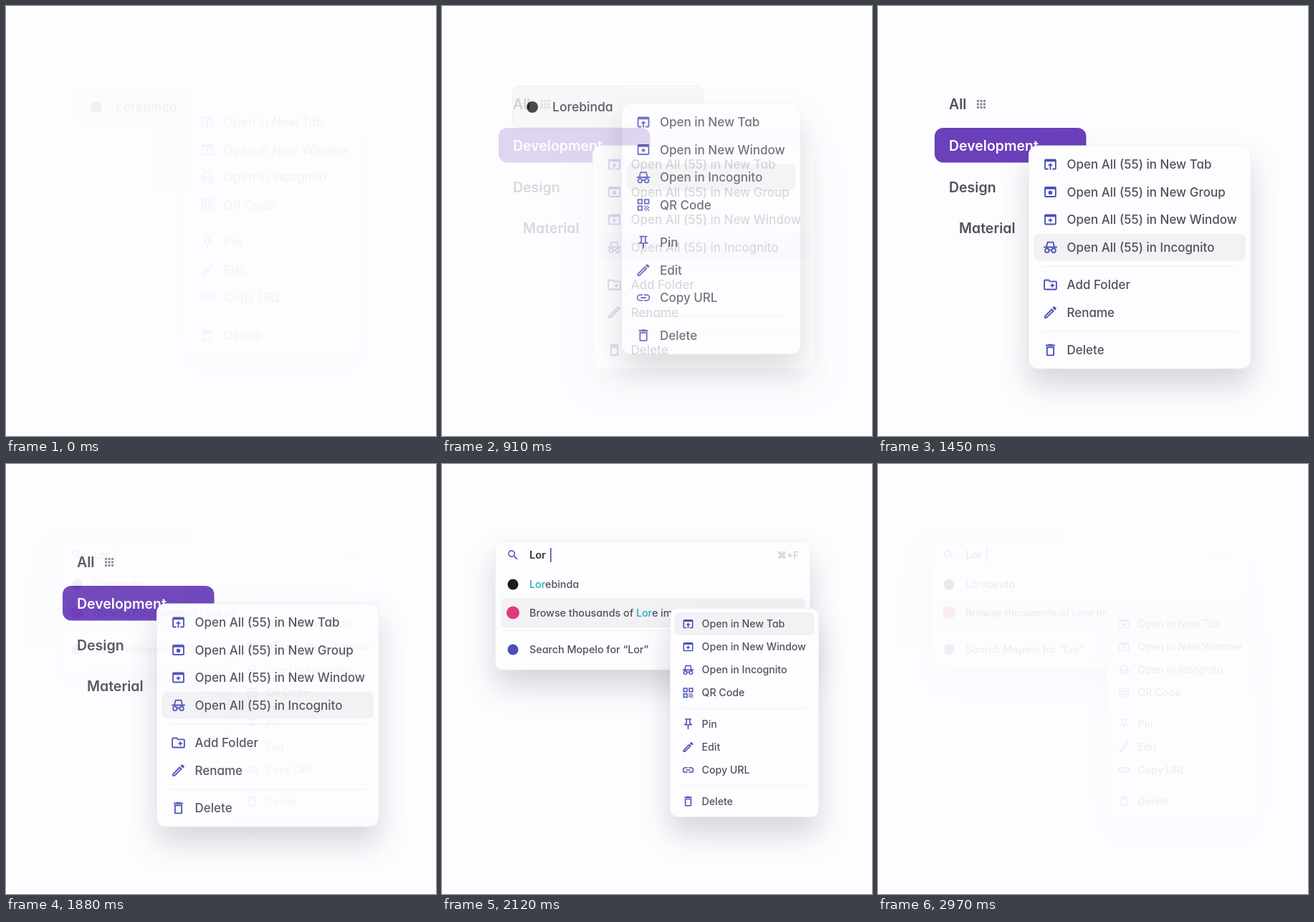
Write an HTML page that moves like this. It is 600 px wide and 600 px high and loops after 3 s.

```html
<!DOCTYPE html>
<html lang="en">
<head>
<meta charset="utf-8">
<title>Context menus</title>
<style>
  html, body { margin: 0; height: 100%; overflow: hidden; background: #fdfcff; }
  svg { display: block; width: 100vw; height: 100vh; }
  text { font-family: Inter, "Open Sans", sans-serif; font-feature-settings: "cv11"; fill: #4f5359; white-space: pre; }
  .paper { fill: #fdfcff; }
  .panel { fill: #fdfcff; stroke: #f0eff3; }
  .hover { fill: #f2f1f4; }
  .rule { stroke: #efeef2; }
  .icon { fill: #4a50b5; fill-rule: evenodd; }
  .line { fill: none; stroke: #4a50b5; stroke-width: 1.9; stroke-linejoin: round; }
  .hit { fill: #1fb0c2; }
</style>
</head>
<body>
<svg viewBox="0 0 600 600" xmlns="http://www.w3.org/2000/svg">
  <defs>
    <filter id="shadow" x="-40%" y="-40%" width="180%" height="200%" color-interpolation-filters="sRGB">
      <feDropShadow dx="0" dy="23" stdDeviation="20" flood-color="#26262e" flood-opacity=".18"/>
    </filter>
  </defs>
  <g id="bookmark"></g>
  <g id="folders"></g>
  <g id="search"></g>
</svg>
<script>
const LOOP = 3000;
const frame = 'M19 4H5a2 2 0 0 0-2 2v12a2 2 0 0 0 2 2h14a2 2 0 0 0 2-2V6a2 2 0 0 0-2-2zm0 14H5V8h14z';

const icons = {
  tab: 'M19 4H5a2 2 0 0 0-2 2v12a2 2 0 0 0 2 2h4v-2H5V8h14v10h-4v2h4a2 2 0 0 0 2-2V6a2 2 0 0 0-2-2zm-7 6l-4 4h3v6h2v-6h3z',
  win: frame + 'm-8-8h2v2h2v2h-2v2h-2v-2H9v-2h2z',
  group: frame + 'm-10-5a3 3 0 1 0 6 0 3 3 0 1 0-6 0z',
  qr: 'M3 3h8v8H3zm2 2v4h4V5zM13 3h8v8h-8zm2 2v4h4V5zM3 13h8v8H3zm2 2v4h4v-4z' +
    [[13, 13], [17, 13], [15, 15], [19, 15], [13, 17], [17, 17], [15, 19], [19, 19]]
      .map(([x, y]) => `M${x} ${y}h2v2h-2z`).join(''),
  pin: 'M14 4v5q0 1.7 1 3H9q1-1.3 1-3V4zm3-2H7a1 1 0 0 0 0 2h1v5a3 3 0 0 1-3 3v2h6v7l1 1 1-1v-7h6v-2a3 3 0 0 1-3-3V4h1a1 1 0 0 0 0-2z',
  edit: 'M14.06 9.02l.92.92L5.92 19H5v-.92zM17.66 3q-.4 0-.7.29l-1.83 1.83 3.75 3.75 1.83-1.83a1 1 0 0 0 0-1.41l-2.34-2.34q-.3-.29-.71-.29zm-3.6 3.19L3 17.25V21h3.75L17.81 9.94z',
  link: 'M3.9 12A3.1 3.1 0 0 1 7 8.9h4V7H7a5 5 0 0 0 0 10h4v-1.9H7A3.1 3.1 0 0 1 3.9 12zM8 13h8v-2H8zm9-6h-4v1.9h4a3.1 3.1 0 0 1 0 6.2h-4V17h4a5 5 0 0 0 0-10z',
  bin: 'M6 19a2 2 0 0 0 2 2h8a2 2 0 0 0 2-2V7H6zM8 9h8v10H8zm7.5-5l-1-1h-5l-1 1H5v2h14V4z',
  add: 'M20 6h-8l-2-2H4a2 2 0 0 0-2 2v12a2 2 0 0 0 2 2h16a2 2 0 0 0 2-2V8a2 2 0 0 0-2-2zm0 12H4V6h5.2l2 2H20zM14 10h2v2h2v2h-2v2h-2v-2h-2v-2h2z',
  find: 'M15.5 14h-.8l-.27-.27A6.5 6.5 0 1 0 13.73 14.43l.27.28v.79l5 4.99L20.49 19zM9.5 14a4.5 4.5 0 1 1 0-9 4.5 4.5 0 0 1 0 9z',
};
const lines = {
  hat: 'M2 12h20M6 12 7.6 5q.2-.8 1-.6L12 5l3.4-.6q.8-.2 1 .6L18 12M4 17a3 3 0 1 0 6 0 3 3 0 1 0-6 0M14 17a3 3 0 1 0 6 0 3 3 0 1 0-6 0M10 16.7q2-1.2 4 0',
};

const rect = (cls, x, y, w, h, r, extra = '') =>
  `<rect class="${cls}" x="${x}" y="${y}" width="${w}" height="${h}" rx="${r}" ${extra}/>`;
const panel = (x, y, w, h, r) => rect('panel', x, y, w, h, r, 'filter="url(#shadow)"');
const dot = (x, y, r, color) => `<circle cx="${x}" cy="${y}" r="${r}" fill="${color}"/>`;
const rule = (x1, x2, y) => `<path class="rule" d="M${x1} ${y}H${x2}"/>`;
const text = (x, y, size, str, weight = 450, extra = '') =>
  `<text x="${x}" y="${y}" font-size="${size}" font-weight="${weight}" ${extra}>${str}</text>`;
const hit = str => `<tspan class="hit">${str}</tspan>`;
const icon = (name, x, y, scale = 0.93) =>
  `<path class="${lines[name] ? 'line' : 'icon'}" d="${icons[name] || lines[name]}"
    transform="translate(${x} ${y}) scale(${scale}) translate(-12 -12)"/>`;

// A null row is a separator.
function menu(x, y, w, rows, hover, scale = 1) {
  let cy = 26, body = '';
  rows.forEach((row, i) => {
    if (!row) {
      body += rule(19, w - 19, cy - 12);
      cy += 14;
      return;
    }
    if (i === hover) body += rect('hover', 7, cy - 19, w - 14, 38, 8);
    body += icon(row[0], 30, cy) + text(53, cy + 6, 17, row[1]);
    cy += 38.5;
  });
  const height = cy - 12.5;
  return panel(x, y, w * scale, height * scale, 12 * scale) +
    `<g transform="translate(${x} ${y}) scale(${scale})">${body}</g>`;
}

const linkRows = [
  ['tab', 'Open in New Tab'], ['win', 'Open in New Window'], ['hat', 'Open in Incognito'], ['qr', 'QR Code'],
  null, ['pin', 'Pin'], ['edit', 'Edit'], ['link', 'Copy URL'],
  null, ['bin', 'Delete'],
];
const folderRows = [
  ['tab', 'Open All (55) in New Tab'], ['group', 'Open All (55) in New Group'],
  ['win', 'Open All (55) in New Window'], ['hat', 'Open All (55) in Incognito'],
  null, ['add', 'Add Folder'], ['edit', 'Rename'],
  null, ['bin', 'Delete'],
];

function bookmark() {
  return rect('hover', 98.5, 111.5, 265.5, 58.5, 9, 'style="fill:#f6f5f8;stroke:#ecebef"') +
    dot(126, 141, 8, '#1c1c1e') +
    text(154, 147, 17.5, 'Lorebinda', 550, 'style="fill:#33363a"') +
    menu(251, 136, 249, linkRows, 2);
}

function folders() {
  let grid = '';
  for (let i = 0; i < 9; i++) {
    grid += rect('', 138 + i % 3 * 4.5, 131 + Math.floor(i / 3) * 4.5, 3, 3, 0.5, 'fill="#85898e"');
  }
  return text(99, 144, 19.5, 'All', 600) + grid +
    rect('', 79, 170, 211.5, 48.5, 12, 'fill="#6a40bb"') +
    text(99, 202, 19.5, 'Development', 600, 'style="fill:#fff"') +
    text(99, 259.5, 19.5, 'Design', 600) +
    text(113, 317, 19.5, 'Material', 600) +
    menu(210.5, 195, 309.5, folderRows, 3);
}

function search() {
  return panel(74.5, 107.5, 439, 179.5, 10) +
    icon('find', 99, 127, 0.76) +
    text(122, 131.5, 14.5, 'Lor', 600, 'style="fill:#33363a"') +
    rect('icon', 151, 117, 1.6, 20, 0) +
    text(498, 132, 13.5, '⌘+F', 400, 'text-anchor="end" style="fill:#c3c3c8"') +
    dot(99, 168, 7.5, '#1c1c1e') +
    text(122, 172.5, 14.3, hit('Lor') + 'ebinda', 500) +
    rect('hover', 82, 187, 424.5, 41, 6) +
    dot(99, 207.5, 9, '#e0387c') +
    text(122, 212.5, 14.3, `Browse thousands of ${hit('Lor')}e images`, 500) +
    rule(85, 503, 232.5) +
    dot(99, 259, 7.5, '#4a50b5') +
    text(122, 264, 14.3, 'Search Mopelo for “Lor”', 500) +
    menu(318.5, 201.5, 249, linkRows, 0, 0.832);
}

// Opacity steps [ms, value]; each scene dissolves over the one below.
const scenes = [
  ['bookmark', bookmark, [[0, 0.05], [238, 1], [1115, 1], [1115, 0], [LOOP, 0]]],
  ['folders', folders, [[0, 0], [860, 0], [1108, 1], [2125, 1], [2125, 0], [LOOP, 0]]],
  ['search', search, [[0, 0], [1868, 0], [2116, 1], [2742, 1], [2992, 0], [LOOP, 0]]],
];

for (const [id, draw, steps] of scenes) {
  const el = document.getElementById(id);
  el.innerHTML = rect('paper', 0, 0, 600, 600, 0) + draw();
  el.animate(
    steps.map(([ms, opacity]) => ({ offset: ms / LOOP, opacity })),
    { duration: LOOP, iterations: Infinity }
  );
}
</script>
</body>
</html>
```
